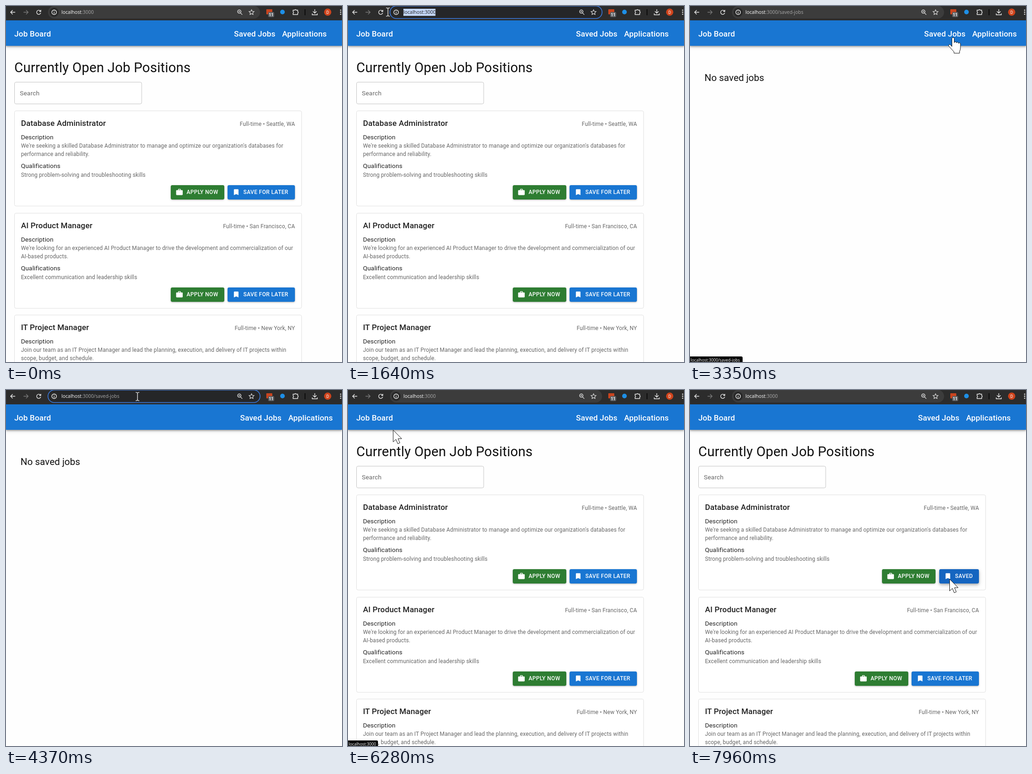
An HTML page for the animation above (8 s loop, 728 by 769 pixels).

```html
<!DOCTYPE html>
<html lang="en">
<head>
<meta charset="utf-8">
<title>Job Board</title>
<style>
html, body { margin: 0; width: 100%; height: 100%; overflow: hidden; background: #fefefe; }
svg { display: block; width: 728px; height: 769px; }
text { font-family: Roboto, sans-serif; fill: #212121; white-space: pre; }
.h4 { font-size: 29.12px; letter-spacing: .00735em; fill: #111; }
.h5 { font-size: 20.5px; fill: #111; }
.h6 { font-size: 17.08px; font-weight: 500; letter-spacing: .0075em; }
.body1 { font-size: 13.67px; letter-spacing: .00938em; }
.body2 { font-size: 12px; letter-spacing: .01071em; fill: #666; }
.label { font-size: 11.95px; font-weight: 500; letter-spacing: .02857em; fill: #fff; }
.hint { fill: #666; }
.nav text { fill: #fff; }
.url { font: 10.4px "Open Sans", sans-serif; fill: #fff; }
.dim { fill: #a9a9a9; }
.dark, .dark tspan { fill: #1f1f1f; }
.tip { font: 8.8px "Open Sans", sans-serif; fill: #fff; }
.end { text-anchor: end; }
.mid { text-anchor: middle; }
.raised { filter: drop-shadow(0 1.5px .8px #0003) drop-shadow(0 1px 2px #0002); }
.high { filter: drop-shadow(0 2px 2px #0003) drop-shadow(0 3px 4px #0003); }
.bar { filter: drop-shadow(0 2px 1.5px #0003) drop-shadow(0 2.5px 2.5px #0002) drop-shadow(0 1px 4px #0002); }
.line { fill: none; stroke: #e8e8e8; stroke-width: 1.4; }
</style>
</head>
<body>
<svg id="stage" viewBox="0 0 728 769"></svg>
<script>
const LOOP = 8000, STEP = 68.8;
const BLUE = '#1976d2', DEEP = '#1565c0', GREEN = '#2e7d32';
const HOST = 'localhost:3000', SAVED = '/saved-jobs';

const text = (x, y, s, cls) => `<text x="${x}" y="${y}" class="${cls}">${s}</text>`;
const rect = (x, y, w, h, r, attrs) =>
  `<rect x="${x}" y="${y}" width="${w}" height="${h}" rx="${r}" ${attrs}/>`;
const line = (d, attrs = '') => `<path class="line" d="${d}" ${attrs}/>`;
const group = (id, body, attrs = '') => `<g id="${id}" ${attrs}>${body}</g>`;

const WORK = 'M20 6h-4V4c0-1.1-.9-2-2-2h-4c-1.1 0-2 .9-2 2v2H4c-1.1 0-2 .9-2 2v11c0 1.1.9 2 2 2h16c1.1 0 2-.9 2-2V8c0-1.1-.9-2-2-2zm-6 0h-4V4h4v2z';
const MARK = 'M17 3H7c-1.1 0-2 .9-2 2v16l7-3 7 3V5c0-1.1-.9-2-2-2z';

const plate = (x, w, attrs) => rect(x, 387, w, 31, 3.4, attrs);

function button(x, w, label, icon, color, shadow = 'raised', overlay = '') {
  return plate(x, w, `fill="${color}" class="${shadow}"`) + overlay +
    `<path d="${icon}" fill="#fff" transform="translate(${x + 10.2} 393.5) scale(.712)"/>` +
    text(x + 34.2, 406, label, 'label');
}

function card(i, job) {
  const first = i === 0;
  const hover = first ? plate(480, 146, `id="hover" fill="${DEEP}" class="high"`) : '';
  return `<g transform="translate(0 ${[0, 221, 441][i]})">` +
    rect(18.5, 226.5, 622, 205.5, 3.4, 'fill="#fff" stroke="#e0e0e0"') +
    text(32.4, 259, job.title, 'h6') +
    text(626.2, 258.5, 'Full-time • ' + job.place, 'body2 end') +
    text(32.4, 288, 'Description', 'body1') +
    text(32.4, 306, job.about[0], 'body2') +
    text(32.4, 323.5, job.about[1], 'body2') +
    text(32.4, 350, 'Qualifications', 'body1') +
    text(32.4, 368.5, job.skill, 'body2') +
    group('apply' + i, button(357, 116, 'APPLY NOW', WORK, GREEN)) +
    group('later' + i, button(480, 146, 'SAVE FOR LATER', MARK, BLUE, 'raised', hover)) +
    (first ? group('done', button(540, 86, 'SAVED', MARK, DEEP, 'high')) : '') + '</g>';
}

const jobs = [
  { title: 'Database Administrator', place: 'Seattle, WA',
    about: ["We're seeking a skilled Database Administrator to manage and optimize our organization's databases for",
      'performance and reliability.'],
    skill: 'Strong problem-solving and troubleshooting skills' },
  { title: 'AI Product Manager', place: 'San Francisco, CA',
    about: ["We're looking for an experienced AI Product Manager to drive the development and commercialization of our",
      'AI-based products.'],
    skill: 'Excellent communication and leadership skills' },
  { title: 'IT Project Manager', place: 'New York, NY',
    about: ['Join our team as an IT Project Manager and lead the planning, execution, and delivery of IT projects within',
      'scope, budget, and schedule.'],
    skill: '' }
];

const home = text(18, 142.5, 'Currently Open Job Positions', 'h4') +
  rect(18.5, 164.5, 275.5, 47, 3.4, 'fill="#fff" stroke="#c4c4c4"') +
  text(30, 192.5, 'Search', 'body1 hint') +
  jobs.map((job, i) => card(i, job)).join('');

const nav = rect(0, 31, 728, 55, 0, `fill="${BLUE}" class="bar"`) +
  text(18, 65.5, 'Job Board', 'h6') +
  group('links', text(494, 65.5, 'Saved Jobs', 'h6') + text(598.2, 65.5, 'Applications', 'h6'));

const urlText = cls =>
  text(120, 17, `${HOST.slice(0, 9)}<tspan class="dim">:3000<tspan class="path"></tspan></tspan>`, cls);

const chrome = rect(0, 0, 728, 31, 0, 'fill="#2c2c2c"') +
  line('M20 13.5H10.5M14.5 9l-4.5 4.5 4.5 4.5') +
  line('M38 13.5h9.5M43.5 9l4.5 4.5-4.5 4.5', 'style="stroke:#777"') +
  line('M74.6 11a4.5 4.5 0 1 0 .7 3.6M75.5 8.5v3.2h-3.4') +
  rect(91, 0, 459.5, 27, 13.5, 'id="pill"') +
  '<circle cx="104.3" cy="13.5" r="10" fill="#292929"/><circle cx="104.3" cy="13.5" r="5" class="line"/>' +
  line('M104.3 10.5v1.3M104.3 13v3.5') +
  urlText('url') +
  '<clipPath id="cut"><rect id="range" y="6" height="15.5"/></clipPath>' +
  group('chosen', rect(120, 6, 140, 15.5, 0, 'fill="#c5d9fb"') + urlText('url dark'), 'clip-path="url(#cut)"') +
  '<circle cx="505.5" cy="12" r="3.6" class="line"/>' +
  line('M508 14.8l4 4M503.9 12h3.2M505.5 10.4v3.2', 'style="stroke-width:1.2"') +
  line('M532 8l1.6 3.6 3.9.4-2.9 2.6.8 3.9-3.4-2-3.4 2 .8-3.9-2.9-2.6 3.9-.4z', 'style="stroke-width:1.1"') +
  rect(564, 7, 13, 11, 1, 'fill="#c9441f"') +
  rect(568, 13, 13, 11, 2.5, 'fill="#5d6064"') +
  '<text x="574.5" y="22" class="mid" style="font-size:8.5px;font-weight:700;fill:#fff">11</text>' +
  '<circle cx="599" cy="13" r="5" fill="#1e8fe6"/>' +
  line('M622 9h3.4a1.8 1.8 0 0 1 3.4 0h3.2v3a1.8 1.8 0 0 1 0 3.4v3.1h-10v-3a1.8 1.8 0 0 0 0-3.4z') +
  rect(647, 7, 1.6, 13, 0, 'fill="#050505"') +
  line('M669 7v8M665 11.5l4 4 4-4M663.5 16v3h11v-3') +
  '<circle cx="697" cy="13.3" r="7.8" fill="#d0441c"/>' +
  '<text x="697" y="16.6" class="mid" style="font-size:9px;fill:#fff">D</text>' +
  [9, 13.4, 17.8].map(y => `<circle cx="725" cy="${y}" r="1.3" fill="#e8e8e8"/>`).join('');

const status = rect(-4, 757, 118, 16, 3, 'id="bubble" fill="#050505"') +
  '<text id="link" x="1.5" y="768" class="tip"></text>';

const edge = 'fill="#fff" stroke="#111" stroke-linejoin="round"';
const cursor =
  `<path id="arrow" d="M.5.5V26l6-5.5 4 9.5 4.5-2-4-9H19z" ${edge}/>` +
  `<path id="hand" d="M-2.5 2.5a2.5 2.5 0 0 1 5 0v9c0-3 5-3 5 .5 0-2.5 4.5-2.5 4.5 1 0-2 4-2 4 1v9q0 4-2 7v4h-12v-3l-11-12c-2-3 1.5-5 3.5-3l3 3.5z" ${edge}/>` +
  '<path id="beam" d="M-4-9q4 0 4 2 0-2 4-2M0-7V7M-4 9q4 0 4-2 0 2 4 2" class="line"/>';

const $ = id => document.getElementById(id);
$('stage').innerHTML = rect(0, 0, 728, 769, 0, 'fill="#fefefe"') +
  group('home', home) + group('saved', text(31.6, 162, 'No saved jobs', 'h5')) +
  group('nav', nav, 'class="nav"') + chrome + group('status', status) + group('cursor', cursor);

// Bursts of pointer movement; the picture rests between them.
const bursts = [[0, 0], [260, 1020], [1080, 1640], [1900, 2660], [2730, 3350], [3610, 4370],
  [4500, 4850], [5050, 5050], [5250, 6010], [6140, 6910], [6980, 7750], [7820, 7960]];

// Pointer: time, x, y, shape from there on.
const track = [
  [260, 720, 750, 'arrow'], [540, 600, 560, 'arrow'], [760, 390, 270, 'arrow'], [1020, 200, 40, 'arrow'],
  [1149, 196, 31, 'arrow'], [1215, 193, 16, 'beam'], [1350, 190, 13, 'beam'], [1640, 83, 13, 'beam'],
  [1900, 90, 15, 'beam'], [2035, 190, 40, 'arrow'], [2300, 420, 130, 'arrow'], [2519, 508, 163, 'arrow'],
  [2660, 567, 150, 'arrow'], [2860, 569, 72, 'hand'], [3349, 570, 68, 'hand'],
  [3610, 562, 64, 'hand'], [3740, 500, 46, 'arrow'], [3950, 400, 26, 'beam'], [4370, 284, 14, 'beam'],
  [4500, 265, 14, 'beam'], [4843, 70, 14, 'beam'], [5050, 88, 11, 'arrow'], [5250, 88, 18, 'arrow'],
  [5456, 83, 46, 'arrow'], [5520, 82, 56, 'hand'], [6010, 80, 56, 'hand'], [6140, 84, 66, 'hand'],
  [6277, 97, 86, 'arrow'], [6600, 310, 175, 'arrow'], [6900, 478, 258, 'arrow'], [7050, 457, 290, 'arrow'],
  [7300, 500, 378, 'arrow'], [7390, 520, 398, 'hand'], [7500, 545, 416, 'hand'], [7740, 562, 408, 'hand'],
  [7885, 562, 408, 'arrow']
];

function stepped(t) {
  const [from, to] = bursts.filter(b => b[0] <= t).pop();
  return Math.min(to, from + Math.floor((t - from) / STEP) * STEP);
}

function pointer(t) {
  const i = track.findLastIndex(k => k[0] <= t);
  if (i < 0) return null;
  const a = track[i], b = track[i + 1] || a;
  const p = b === a ? 0 : (t - a[0]) / (b[0] - a[0]);
  return { x: a[1] + (b[1] - a[1]) * p, y: a[2] + (b[2] - a[2]) * p, shape: a[3] };
}

const show = (id, on) => { $(id).style.display = on ? '' : 'none'; };
const set = (id, attrs) => { for (const k in attrs) $(id).setAttribute(k, attrs[k]); };
const within = (t, a, b) => t >= a && t < b;

function draw(now) {
  const t = stepped(now % LOOP), p = pointer(t);
  show('cursor', p);
  if (p) {
    set('cursor', { transform: `translate(${p.x} ${p.y})` });
    ['arrow', 'hand', 'beam'].forEach(s => show(s, s === p.shape));
  }

  const away = within(t, 3200, 5850);
  show('home', !away);
  show('saved', away);
  set('links', { transform: `translate(${away ? 13.2 : 0} 0)` });
  document.querySelectorAll('.path').forEach(e => { e.textContent = away ? SAVED : ''; });

  const focus = within(t, 1350, 3130) || within(t, 4360, 5720);
  set('pill', focus
    ? { fill: '#252628', stroke: '#3b7be0', 'stroke-width': 1.6 }
    : { fill: '#3c3c3c', stroke: 'none' });
  const dragging = within(t, 1350, 1640) || within(t, 4360, 4840);
  const end = away ? 245 : 189.5;
  const left = dragging ? Math.max(120, Math.min(end, p.x)) : 120;
  show('chosen', focus);
  set('range', { x: left, width: end - left });

  const toSaved = within(t, 2860, 3740), toHome = within(t, 5600, 6400);
  show('status', toSaved || toHome);
  $('link').textContent = HOST + (toSaved ? SAVED : '');
  set('bubble', { width: toSaved ? 118 : 69 });

  const done = t >= 7885;
  show('done', done);
  show('later0', !done);
  set('apply0', { transform: `translate(${done ? 59 : 0} 0)` });
  set('hover', { opacity: Math.max(0, Math.min(1, (t - 7380) / 250)) });
}

function tick() {
  draw(performance.now());
  requestAnimationFrame(tick);
}
tick();
</script>
</body>
</html>
```
